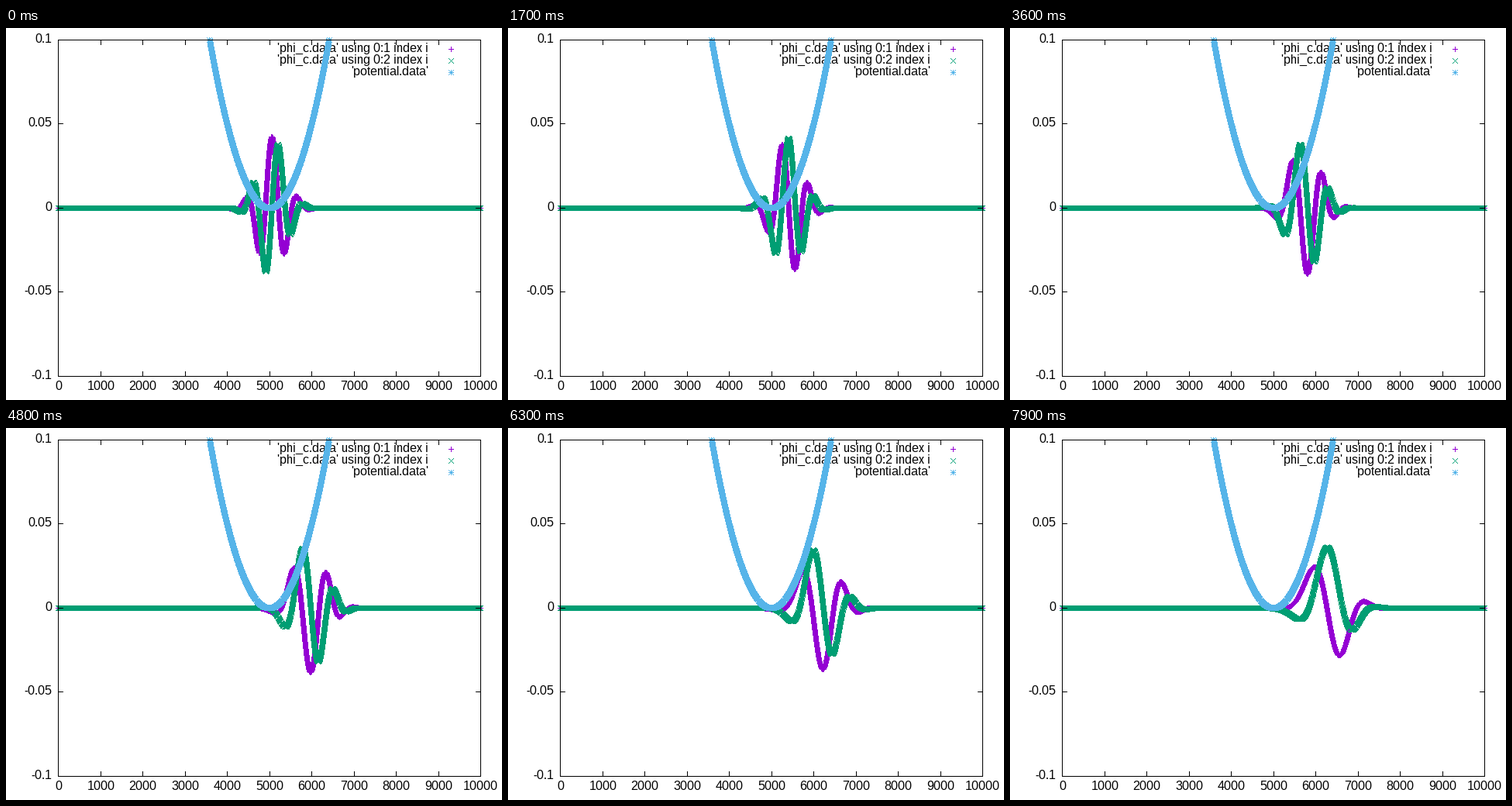
Animation, 640 px wide and 480 px high, one loop 8 s. Source, as a matplotlib script:

```python
import numpy as np
import matplotlib.pyplot as plt
from matplotlib.animation import FuncAnimation

W, H, DPI = 640, 480, 100
LEFT, RIGHT, TOP, BOTTOM = 67, 612, 15, 449
TICK = 6
PURPLE, GREEN, BLUE = (148, 0, 211), (0, 158, 115), (86, 180, 233)
BLACK = (0, 0, 0, 255)

# whole-pixel glyph advances
plt.rcParams["text.hinting"] = "default"
plt.rcParams["text.hinting_factor"] = 1

# marker shapes as pixel offsets (dx, dy)
R = range(-3, 4)
PLUS = [(d, 0) for d in R] + [(0, d) for d in R]
CROSS = [(d, d) for d in R] + [(d, -d) for d in R]
STAR = PLUS + CROSS

# Gaussian packet in a harmonic well, time counted in frames
N = 10000
X0 = 5000
D = 2000.0              # hbar / m
OMEGA = np.sqrt(D * 1e-7)
K0 = 0.01
S2 = 1e5                # initial squared width
T0 = 3
x = np.arange(N)


def packet(t):
    a = OMEGA * t
    c, s = np.cos(a), np.sin(a)
    spread = D / (OMEGA * S2)
    s2 = S2 * (c * c + (spread * s) ** 2)
    y = x - X0 - K0 * D / OMEGA * s
    chirp = S2 * (spread ** 2 - 1) * OMEGA * s * c / (s2 * D)
    action = D * K0 ** 2 * np.sin(2 * a) / (4 * OMEGA)
    gouy = 0.5 * np.arctan2(spread * s, c)
    phase = K0 * X0 + action - gouy + K0 * c * y + chirp * y * y / 2
    return (np.pi * s2) ** -0.25 * np.exp(-y * y / (2 * s2) + 1j * phase)


def to_px(xs):
    return np.floor(LEFT + (RIGHT - LEFT) * xs / N + 0.5).astype(int)


def to_py(v):
    up = np.floor((BOTTOM - TOP) * (v + 0.1) / 0.2 + 0.5).astype(int)
    return BOTTOM - up


def stamp(img, px, py, shape, color):
    mask = np.zeros((H, W), bool)
    for dx, dy in shape:
        mask[py + dy, px + dx] = True
    img[mask] = color + (255,)


fig = plt.figure(figsize=(W / DPI, H / DPI), dpi=DPI, facecolor="white")
ax = fig.add_axes([0, 0, 1, 1])
ax.axis("off")


def layer(img, z):
    return ax.imshow(img, extent=(0, W, H, 0), aspect="auto",
                     interpolation="nearest", zorder=z)


def label(px, py, text, ha):
    ax.text(px, py, text, ha=ha, va="baseline", fontsize=16 * 72 / DPI,
            family="Liberation Sans", color="black", zorder=2)


base = np.full((H, W, 4), 255, np.uint8)
legend = [("'phi_c.data' using 0:1 index i", PLUS, PURPLE),
          ("'phi_c.data' using 0:2 index i", CROSS, GREEN),
          ("'potential.data'", STAR, BLUE)]
for i, (text, shape, color) in enumerate(legend):
    row = 27 + 15 * i
    label(545, row + 4, text, "right")
    stamp(base, 574, row, shape, color)

# the potential and the frame lie above the legend text
front = np.zeros((H, W, 4), np.uint8)
V = 5e-8 * (x - X0) ** 2.0
inside = V <= 0.1
px = to_px(x)
stamp(front, px[inside], to_py(V[inside]), STAR, BLUE)

front[[TOP, BOTTOM], LEFT:RIGHT + 1] = BLACK
front[TOP:BOTTOM + 1, [LEFT, RIGHT]] = BLACK
for v in range(0, N + 1, 1000):
    tx = int(to_px(v))
    front[TOP:TOP + TICK + 1, tx] = BLACK
    front[BOTTOM - TICK:BOTTOM + 1, tx] = BLACK
    label(tx + 0.5, 467, str(v), "center")
for text in ("0.1", "0.05", "0", "-0.05", "-0.1"):
    ty = int(to_py(float(text)))
    front[ty, LEFT:LEFT + TICK + 1] = BLACK
    front[ty, RIGHT - TICK:RIGHT + 1] = BLACK
    label(59, ty + 4, text, "right")

wave_im = layer(base, 1)
layer(front, 3)
ax.set_xlim(0, W)
ax.set_ylim(H, 0)


def update(n):
    psi = packet(n + T0)
    img = base.copy()
    stamp(img, px, to_py(psi.real), PLUS, PURPLE)
    stamp(img, px, to_py(psi.imag), CROSS, GREEN)
    wave_im.set_data(img)
    return [wave_im]


anim = FuncAnimation(fig, update, frames=80, interval=100,
                     repeat=True, repeat_delay=0, blit=False)
plt.show()
```
